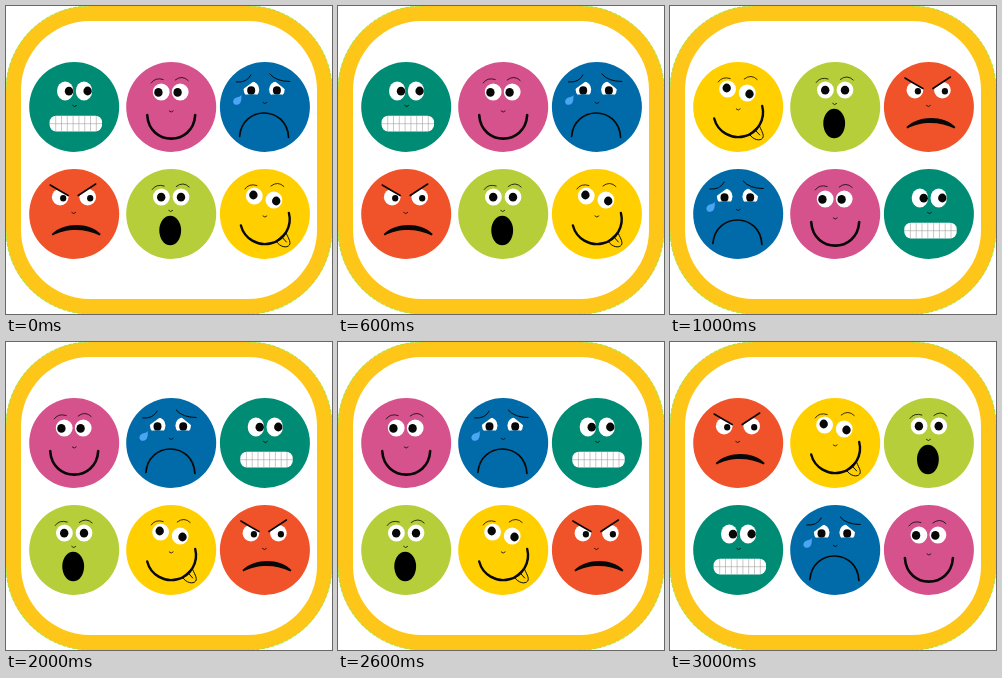
Write an HTML page with a canvas that moves like this. It is 326x308 px and loops after 4000 ms.

```html
<!DOCTYPE html>
<html lang="en">
<head>
<meta charset="utf-8">
<title>Changing faces</title>
<style>
html, body { margin: 0; width: 100%; height: 100%; overflow: hidden; background: #fff; }
canvas { display: block; }
</style>
</head>
<body>
<canvas id="stage" width="326" height="308"></canvas>
<script>
const ctx = document.getElementById('stage').getContext('2d');
const STEP = 1000;
const INK = '#080808';
const COLUMNS = [68.2, 165.2, 258.9];
const ROWS = [101, 208];
const CORNER = 84;
const BORDER = 15;

const ORDERS = [
  ['teal', 'pink', 'blue', 'red', 'lime', 'yellow'],
  ['yellow', 'lime', 'red', 'blue', 'pink', 'teal'],
  ['pink', 'blue', 'teal', 'lime', 'yellow', 'red'],
  ['red', 'yellow', 'lime', 'teal', 'blue', 'pink']
];

function ellipse(x, y, rx, ry, fill) {
  ctx.beginPath();
  ctx.ellipse(x, y, rx, ry, 0, 0, Math.PI * 2);
  ctx.fillStyle = fill;
  ctx.fill();
}

function stroke(d, width = 1, color = INK) {
  ctx.strokeStyle = color;
  ctx.lineWidth = width;
  ctx.stroke(new Path2D(d));
}

function fill(d, color) {
  ctx.fillStyle = color;
  ctx.fill(new Path2D(d));
}

// Eye centre, then the pupil's shift from it and its radius
function eye(x, y, dx, dy, pupil = 4.2, rx = 8.4, ry = 8.6) {
  ellipse(x, y, rx, ry, '#fff');
  ellipse(x + dx, y + dy, pupil, pupil * 1.05, INK);
}

function nose(x, y) {
  stroke(`M${x - 2} ${y - 0.5}q2 2.4 4 0`, 0.8);
}

function brows(x1, y1, x2, y2) {
  stroke(`M${x1} ${y1}q4 -6 12 -3.5M${x2} ${y2}q7 -5.5 13 0.5`, 0.8);
}

const FACES = {
  teal: {
    color: '#008c74',
    draw() {
      eye(-9, -16, 3.8, 0.2, 4.2, 8.2, 9.4);
      eye(9.8, -16, 3.6, 0, 4.2, 8.2, 9.4);
      nose(0.5, -1);
      ctx.beginPath();
      ctx.roundRect(-24.6, 8.7, 52.4, 15.8, 6.5);
      ctx.fillStyle = '#fff';
      ctx.fill();
      ctx.save();
      ctx.clip();
      let grid = 'M-25 16.7h53';
      for (let x = -18.5; x < 27; x += 5.8) grid += `M${x} 8v17`;
      stroke(grid, 0.6, '#a2a2a2');
      ctx.restore();
    }
  },
  pink: {
    color: '#d6528d',
    draw() {
      brows(-20, -24, 4, -27);
      eye(-10, -15, -2.8, 0.4);
      eye(9, -15, -2.6, 0.4);
      nose(0, 4.5);
      stroke('M-24 8C-22 39.5 22 39.5 24 8', 2.6);
    }
  },
  blue: {
    color: '#006ba8',
    draw() {
      eye(-13.5, -17.5, -0.2, 1, 4, 7.8, 8);
      eye(12, -17.5, 0, 1, 4, 7.8, 8);
      // Sloping lids and flat lower edges
      fill('M-23 -27L-8 -28L-12 -25L-23 -17ZM8 -28L21 -27V-17L11 -25Z', this.color);
      fill('M-23 -11.5Q-13 -14 -4 -11.5V-8H-23ZM3 -11.5Q12 -14 21 -11.5V-8H3Z', this.color);
      stroke('M-28.5 -25Q-18 -24 -14 -32M5 -33Q11 -25.5 25 -25.5', 1);
      nose(0, -4);
      fill('M-23.5 -12C-23 -6 -24.5 -2.5 -28 -2.2C-32 -2 -33 -6.5 -30 -8.8C-28 -10 -25.5 -9.5 -23.5 -12Z', '#4aa6f5');
      stroke('M-25.3 29.5C-23 -2 22 -2 23.7 30.5', 1.7);
    }
  },
  red: {
    color: '#f05229',
    draw() {
      eye(-14, -16.8, 3, 1, 3.1, 8.3, 8.3);
      eye(13.5, -16.8, 2.5, 1, 3.1, 8.3, 8.3);
      fill('M-24 -29L-6 -18.5L-3 -27L-20 -33ZM4 -18.5L22 -30L12 -34L0 -28Z', this.color);
      stroke('M-24 -29Q-15 -23.5 -6 -18.5M4 -18.5L21.5 -30', 1.6);
      nose(-0.5, -1);
      fill('M-22.5 20C-10 8 15 8 26.5 20L25.5 21.5C12 14 -9 14 -21.5 21.5Z', INK);
    }
  },
  lime: {
    color: '#b5ce39',
    draw() {
      brows(-19, -24.5, 5, -27.5);
      eye(-9.8, -17, -0.2, 0.2);
      eye(9.8, -17, 0, 0.2);
      nose(-0.5, -3);
      ellipse(-1, 16.5, 10.9, 14.8, '#000');
    }
  },
  yellow: {
    color: '#ffcf00',
    draw() {
      brows(-20, -25, 6, -28);
      eye(-10.6, -18, -0.9, -1);
      eye(9, -14, 2.3, 1);
      nose(0, 2.5);
      const tongue = 'M11.5 27.5C15 33 22 34.5 24.5 31C26.5 28 22.5 22.5 21 18.5Z';
      fill(tongue, this.color);
      stroke(tongue + 'M17 23L21.5 28', 1);
      stroke('M-24 11.5A24.8 24.8 0 0 0 24 -1', 2.4);
    }
  }
};

function frame() {
  ctx.fillStyle = '#fff';
  ctx.fillRect(0, 0, 326, 308);
  ctx.beginPath();
  ctx.roundRect(0, 0, 326, 308, CORNER);
  ctx.fillStyle = '#ffc61a';
  ctx.fill();
  ctx.setLineDash([3, 2]);
  ctx.strokeStyle = '#8ee52b';
  ctx.lineWidth = 0.8;
  const right = 326 - CORNER, bottom = 308 - CORNER;
  [[right, bottom], [CORNER, bottom], [CORNER, CORNER], [right, CORNER]].forEach(([x, y], turn) => {
    ctx.beginPath();
    ctx.arc(x, y, CORNER, turn * Math.PI / 2, (turn + 1) * Math.PI / 2);
    ctx.stroke();
  });
  ctx.setLineDash([]);
  ctx.beginPath();
  ctx.roundRect(BORDER, BORDER, 326 - 2 * BORDER, 308 - 2 * BORDER, CORNER - BORDER);
  ctx.fillStyle = '#fff';
  ctx.fill();
}

function render(time) {
  frame();
  ctx.lineCap = 'round';
  ctx.lineJoin = 'round';
  const order = ORDERS[Math.floor(time / STEP) % ORDERS.length];
  order.forEach((name, i) => {
    const face = FACES[name];
    ctx.save();
    ctx.translate(COLUMNS[i % 3], ROWS[Math.floor(i / 3)]);
    ellipse(0, 0, 45, 45, face.color);
    face.draw();
    ctx.restore();
  });
}

const start = performance.now();
function tick() {
  render(performance.now() - start);
  requestAnimationFrame(tick);
}
tick();
</script>
</body>
</html>
```
